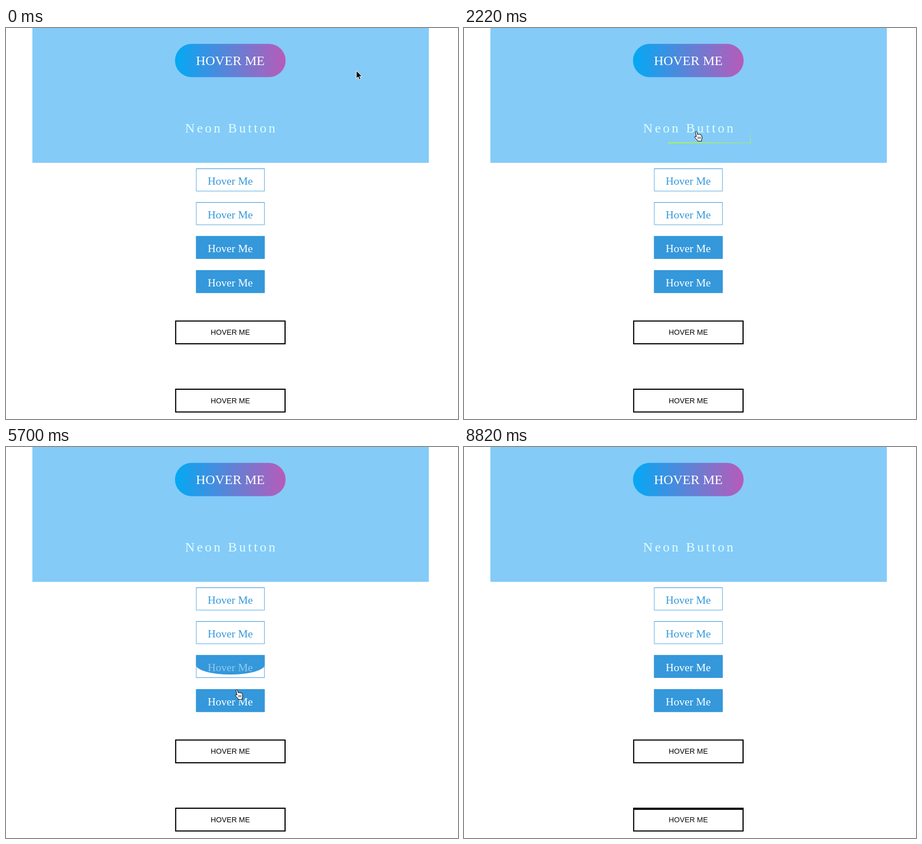
These frames come from a looping animation (805x696 px, 8.88 s). An HTML page:

```html
<!DOCTYPE html>
<html lang="en">
<head>
<meta charset="utf-8">
<title>Hover buttons</title>
<style>
  html, body { margin: 0; width: 100%; height: 100%; overflow: hidden; background: #fff; }
  svg { display: block; }
  text { text-anchor: middle; font-kerning: none; }
  .serif { font-family: "Liberation Serif", Times, serif; }
  .sans { font: 13.1px "Liberation Sans", Arial, sans-serif; }
</style>
</head>
<body>
<svg id="stage" width="805" height="696" viewBox="0 0 805 696">
  <defs>
    <linearGradient id="rainbow" gradientUnits="userSpaceOnUse" y1="0" y2="0">
      <stop offset="0" stop-color="#03a9f4"/>
      <stop offset=".3333" stop-color="#f441a5"/>
      <stop offset=".6667" stop-color="#ffeb3b"/>
      <stop offset="1" stop-color="#03a9f4"/>
    </linearGradient>
    <clipPath id="panelClip"><rect x="47" width="706" height="240"/></clipPath>
  </defs>

  <rect x="47" width="706" height="240" fill="#84cbf8"/>
  <rect x="301" y="28.3" width="197" height="59.2" rx="29.6" fill="url(#rainbow)"/>
  <text class="serif" x="399.5" y="66" font-size="23.6" fill="#fff">HOVER ME</text>

  <g clip-path="url(#panelClip)"><g id="glow" fill="#2196f3"></g></g>
  <svg id="neon" x="287.4" y="149" width="223.8" height="56.5" overflow="hidden"></svg>
  <text id="neonText" class="serif" x="401.2" y="185.5" font-size="23.6" letter-spacing="3.93">Neon Button</text>

  <g id="buttons"></g>
  <g id="cursor">
    <path id="arrow" d="M0 0V14L3.2 11L5.4 16L7.8 15L5.7 10.2H10Z" fill="#000" stroke="#fff"/>
    <g id="hand" stroke="#000" stroke-linejoin="round">
      <path fill="#fff" d="M-.6 9.5L-2.3 1.6Q-2.4 0 -1.1 0Q0 0 .4 1.4L1.5 5.6Q2.6 4.6 3.8 5.6Q5.2 4.8 6.2 6
        Q8.2 5.4 8.8 7.4L9.6 11Q9.8 13 8.6 14.8V17.3H1.8Q.8 15 -1 13.4L-3.6 10.6Q-4 9 -2.4 9Z"/>
      <path fill="none" stroke-width=".8" d="M2.3 9.5V13.5M4.5 9.5V13.5M6.7 9.5V13.5"/>
    </g>
  </g>
</svg>
<script>
const LOOP = 8880, STEP = 60;
const BLUE = [52, 152, 219], WHITE = [255, 255, 255], BLACK = [0, 0, 0];
const CYAN = [224, 255, 255], NAVY = [37, 87, 132];

// Hover spans: [enter, leave] in ms
const pillHover = [440, 1230];
const neonHover = [1505, 2980];

// Pointer path: [time, x, y]
const path = [
  [0, 624, 76], [60, 618, 76], [440, 498, 71], [800, 438, 66], [1080, 432, 66],
  [1230, 428, 88], [1505, 419, 150], [1800, 415, 178], [2220, 414.5, 184],
  [2700, 414, 190], [2980, 413, 206], [3300, 412, 251], [3480, 412, 268],
  [3700, 412, 274], [3850, 413, 291], [3990, 414, 311], [4500, 416, 334],
  [4790, 421, 351], [4810, 421, 371], [4860, 422, 390], [5400, 421, 399],
  [5560, 418, 412], [5700, 412, 432], [5950, 409, 460], [6540, 409, 461],
  [6680, 409, 472], [6880, 408, 521], [7200, 406, 541], [7450, 404, 564],
  [7700, 402, 642], [8100, 400, 660], [8400, 399, 668], [8530, 398, 685], [8620, 398, 720]
];

const $ = id => document.getElementById(id);

function add(parent, tag, attrs = {}, text = "") {
  const el = document.createElementNS("http://www.w3.org/2000/svg", tag);
  set(el, attrs);
  el.textContent = text;
  parent.append(el);
  return el;
}

function set(el, attrs) {
  for (const key in attrs) el.setAttribute(key, attrs[key]);
}

const clamp = v => Math.min(1, Math.max(0, v));
const inside = (t, [a, b]) => t >= a && t < b;
const mix = (a, b, k) => `rgb(${a.map((v, i) => Math.round(v + (b[i] - v) * k))})`;

// cubic-bezier(.25, .1, .25, 1)
function ease(x) {
  if (x <= 0 || x >= 1) return clamp(x);
  const bez = (s, a, b) => 3 * a * s * (1 - s) ** 2 + 3 * b * s * s * (1 - s) + s ** 3;
  let lo = 0, hi = 1;
  for (let i = 0; i < 24; i++) {
    const mid = (lo + hi) / 2;
    if (bez(mid, .25, .25) < x) lo = mid; else hi = mid;
  }
  return bez(lo, .1, 1);
}

function level(t, [enter, leave], dur, delay = 0) {
  return t < leave ? ease((t - enter - delay) / dur) : 1 - ease((t - leave) / dur);
}

// Neon glow and the four running edges
const NW = 223.8, NH = 56.5, EDGE = 2;
for (const blur of [0, 5, 20, 39]) {
  add($("glow"), "rect", { x: 287.4, y: 149, width: NW, height: NH, style: blur ? `filter: blur(${blur}px)` : "" });
}
const edges = [
  { dir: [1, 0], x: 0, y: 0 },
  { dir: [0, 1], x: NW - EDGE, y: 0 },
  { dir: [-1, 0], x: 0, y: NH - EDGE },
  { dir: [0, -1], x: 0, y: 0 }
];
edges.forEach((e, i) => {
  const [dx, dy] = e.dir;
  const grad = add($("neon"), "linearGradient", {
    id: "edge" + i, x1: dx < 0 ? 1 : 0, x2: dx > 0 ? 1 : 0, y1: dy < 0 ? 1 : 0, y2: dy > 0 ? 1 : 0
  });
  add(grad, "stop", { offset: 0, "stop-color": "#adff2f", "stop-opacity": 0 });
  add(grad, "stop", { offset: 1, "stop-color": "#adff2f" });
  e.el = add($("neon"), "rect", { width: dx ? NW : EDGE, height: dy ? NH : EDGE, fill: `url(#edge${i})` });
});

function drawNeon(t) {
  const on = inside(t, neonHover);
  edges.forEach((e, i) => {
    const shift = 2 * ease((t - neonHover[0] - i * 250) / 1000) - 1;
    set(e.el, {
      x: e.x + e.dir[0] * shift * NW,
      y: e.y + e.dir[1] * shift * NH,
      visibility: on ? "visible" : "hidden"
    });
  });
  const lit = level(t, neonHover, 200, 1000);
  set($("glow"), { opacity: lit });
  set($("neonText"), { fill: mix(CYAN, NAVY, lit) });
}

// Blue buttons with a curved fill
const BW = 122.5, BH = 40.8;
const curved = [
  { y: 250, top: true, hover: [3300, 3850] },
  { y: 310, top: false, hover: [3990, 4790] },
  { y: 370.3, top: true, filled: true, hover: [4810, 5560] },
  { y: 431, top: false, filled: true, hover: [5700, 6680] }
];
for (const b of curved) {
  const box = add($("buttons"), "svg", { x: 338.3, y: b.y, width: BW, height: BH, overflow: "hidden" });
  b.fill = add(box, "path", { fill: "#3498db" });
  add(box, "rect", { x: .5, y: .5, width: BW - 1, height: BH - 1, fill: "none", stroke: "#3498db" });
  b.text = add($("buttons"), "text", { class: "serif", x: 399.4, y: b.y + 28.5, "font-size": 19.7 }, "Hover Me");
}

function drawCurved(b, t) {
  const l = level(t, b.hover, 500);
  const k = b.filled ? 1 - l : l;
  const half = .9 * BH * k;
  const base = b.top ? 0 : BH;
  const side = b.top ? half : BH - half;
  set(b.fill, { d: `M0 ${base}V${side}A${BW / 2} ${half} 0 0 ${b.top ? 0 : 1} ${BW} ${side}V${base}Z` });
  set(b.text, { fill: mix(BLUE, WHITE, k) });
}

// Black outlined buttons with a straight fill
const outlined = [
  { y: 520.6, across: true, hover: [6880, 7450] },
  { y: 642, across: false, hover: [7700, 8530] }
];
for (const b of outlined) {
  b.fill = add($("buttons"), "rect", { x: 303, y: b.y + 2, width: 193, height: 38.5 });
  add($("buttons"), "rect", { x: 302.2, y: b.y + 1, width: 194.8, height: 40.5, fill: "none", stroke: "#000", "stroke-width": 2 });
  b.text = add($("buttons"), "text", { class: "sans", x: 399.5, y: b.y + 25.7 }, "HOVER ME");
}

function drawOutlined(b, t) {
  const k = level(t, b.hover, 400);
  set(b.fill, b.across ? { width: 193 * k } : { height: 38.5 * k });
  set(b.text, { fill: mix(BLACK, WHITE, k) });
}

function drawPill(t) {
  const shift = inside(t, pillHover) ? 2.4 * (t - pillHover[0]) / 1000 : 0;
  const x1 = 301 - shift * 197;
  set($("rainbow"), { x1, x2: x1 + 4 * 197 });
}

const hovers = [pillHover, neonHover, ...curved.map(b => b.hover), ...outlined.map(b => b.hover)];

function drawCursor(t) {
  let i = path.findIndex(p => p[0] > t);
  if (i < 0) i = path.length - 1;
  const [ta, xa, ya] = path[i - 1], [tb, xb, yb] = path[i];
  const k = clamp((t - ta) / (tb - ta));
  const over = hovers.some(h => inside(t, h));
  set($("cursor"), { transform: `translate(${xa + (xb - xa) * k} ${ya + (yb - ya) * k})` });
  set($("hand"), { visibility: over ? "visible" : "hidden" });
  set($("arrow"), { visibility: over ? "hidden" : "visible" });
}

function draw(t) {
  drawPill(t);
  drawNeon(t);
  curved.forEach(b => drawCurved(b, t));
  outlined.forEach(b => drawOutlined(b, t));
  drawCursor(t);
}

const start = performance.now();
function tick() {
  const t = (performance.now() - start) % LOOP;
  draw(Math.floor(t / STEP) * STEP);
  requestAnimationFrame(tick);
}
tick();
</script>
</body>
</html>
```
